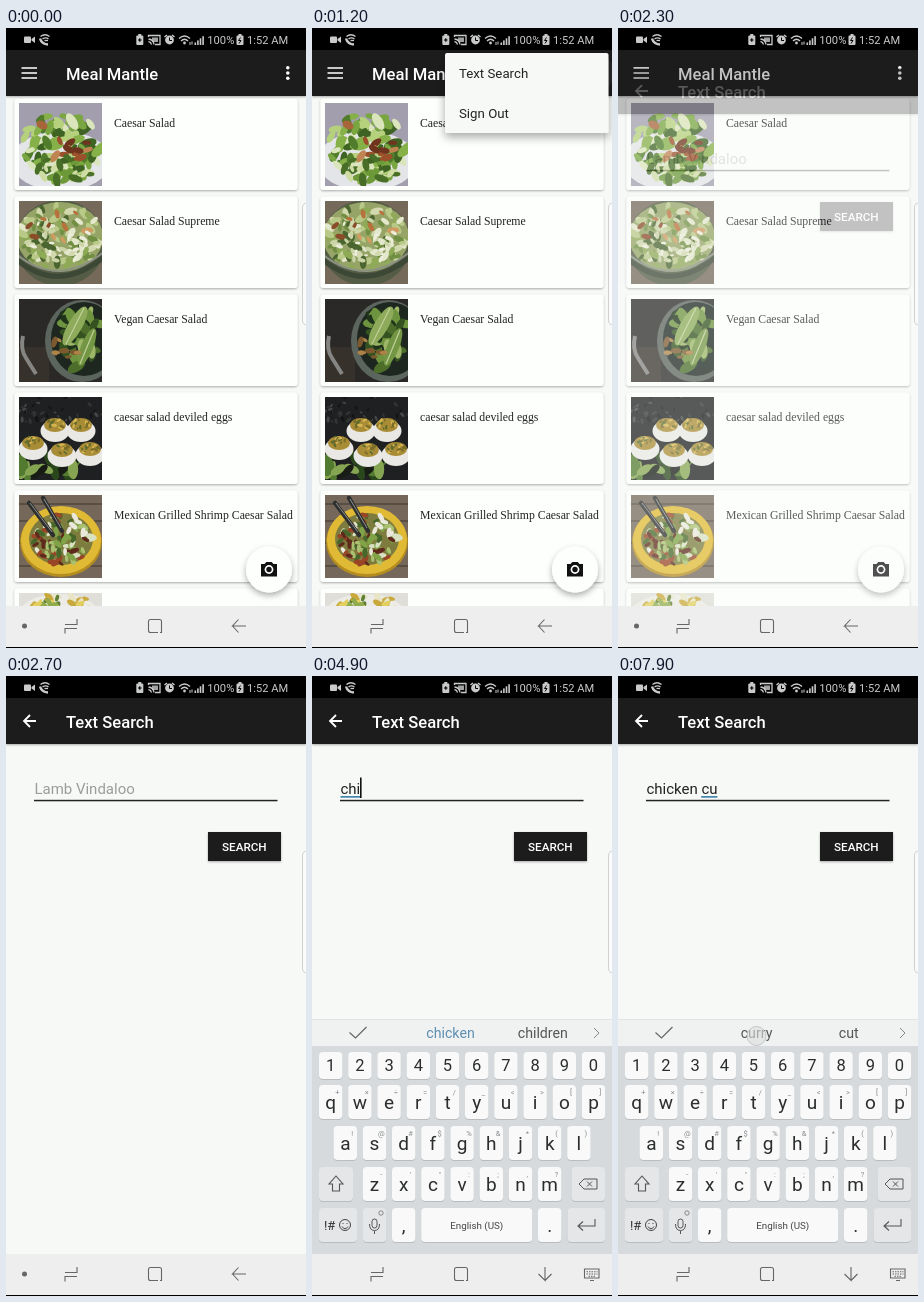
Write an HTML page that moves like this. It is 300x620 px and loops after 8 s.

```html
<!DOCTYPE html>
<html lang="en">
<head>
<meta charset="utf-8">
<title>Recipe text search</title>
<style>
  html, body { margin: 0; width: 100%; height: 100%; overflow: hidden; background: #000; }
  svg { display: block; width: 100vw; height: 100vh; font-family: Roboto, sans-serif; }
  text { white-space: pre; }
  .mid { text-anchor: middle; }
  .medium { font-weight: 500; }
  .serif { font-family: "Liberation Serif", serif; }
  .line { fill: none; stroke: #666; stroke-width: 1.1; }
</style>
</head>
<body>
<svg id="stage" viewBox="0 0 300 620" xmlns="http://www.w3.org/2000/svg"></svg>
<script>
const INK = '#1c1e1e', PAPER = '#f7f9f7', ICON = '#c9cbca';

const rect = (x, y, w, h, fill, extra = '') =>
  `<rect x="${x}" y="${y}" width="${w}" height="${h}" fill="${fill}" ${extra}/>`;
const circle = (x, y, r, fill, extra = '') =>
  `<circle cx="${x}" cy="${y}" r="${r}" fill="${fill}" ${extra}/>`;
const oval = (x, y, rx, ry, fill, angle = 0) =>
  `<ellipse rx="${rx}" ry="${ry}" fill="${fill}" transform="translate(${x} ${y}) rotate(${angle})"/>`;
const line = (d, stroke, width = 1, extra = '') =>
  `<path d="${d}" fill="none" stroke="${stroke}" stroke-width="${width}" ${extra}/>`;
const label = (x, y, size, fill, str, cls = '', extra = '') =>
  `<text x="${x}" y="${y}" font-size="${size}" fill="${fill}" class="${cls}" ${extra}>${str}</text>`;

// Scatter seeded ellipses inside an elliptical area.
function scatter(seed, n, cx, cy, rx, ry, size, colors) {
  const rnd = () => (seed = (seed * 16807) % 2147483647) / 2147483647;
  for (let i = 0; i < 5; i++) rnd();
  let out = '';
  for (let i = 0; i < n; i++) {
    const a = rnd() * 6.283, d = Math.sqrt(rnd()), s = size * (0.6 + rnd() * 0.7);
    out += oval((cx + rx * d * Math.cos(a)).toFixed(1), (cy + ry * d * Math.sin(a)).toFixed(1),
      s.toFixed(1), (s * 0.5).toFixed(1), colors[i % colors.length], Math.round(rnd() * 180));
  }
  return out;
}

const egg = (x, y) => oval(x, y + 3, 14.5, 11, '#e9e8e4') + oval(x, y - 3, 11, 7, '#a98c36') +
  scatter(x * 31 + y, 14, x, y - 4, 9, 5, 2.3, ['#d5b552', '#7b6c28', '#5d6b2c']);

const photos = [
  () => rect(0, 0, 83, 83, '#a29eae') + oval(42, 58, 50, 30, '#e4e5e8') +
    scatter(71, 70, 43, 43, 39, 33, 8, ['#86b048', '#b5d17c', '#507c2b', '#dbe5bb', '#79a640', '#3e6323']) +
    scatter(19, 11, 50, 46, 22, 11, 5.5, ['#9b4f2b', '#6f341d', '#c08452']) + oval(23, 22, 6, 4, '#a7653a', 30) +
    scatter(43, 24, 46, 67, 34, 12, 6, ['#6d9939', '#cfdda5', '#496e28']),
  () => rect(0, 0, 83, 83, '#75695a') + oval(41, 42, 45, 43, '#545c46') + oval(41, 36, 43, 35, '#96a468') +
    scatter(97, 95, 41, 36, 40, 32, 5.5, ['#b9c987', '#718f42', '#e3e7cb', '#8faa57', '#4a652f', '#d2d9ae']) +
    scatter(8, 10, 38, 24, 33, 18, 5, ['#b7713c', '#8b4c29', '#cf9b61']) +
    scatter(29, 30, 42, 40, 34, 24, 3.2, ['#eceddb', '#cbd4a7']) +
    line('M-3 53Q40 88 86 50', '#8b9283', 2) + line('M-2 59Q40 93 85 56', '#3c4735', 5),
  () => rect(0, 0, 83, 83, '#2a2928') + rect(0, 48, 30, 35, '#37312c') +
    oval(63, 42, 37, 41, '#5c645e') + oval(65, 40, 33, 37, '#1d2720') +
    scatter(53, 36, 61, 38, 23, 32, 8, ['#6f9440', '#34521f', '#9db668', '#4c6e2a', '#1f321a']) +
    oval(56, 27, 7, 22, '#8dab5a', 30) + oval(68, 48, 6, 20, '#739644', 22) +
    line('M65 9L47 45M75 31L61 65', '#c1d09a', 1.2) +
    scatter(12, 9, 47, 48, 14, 13, 4.5, ['#ad8347', '#7c592f']) +
    line('M4 37Q1 50 7 59L17 75', '#858583', 4),
  () => rect(0, 0, 83, 83, '#1f2021') +
    scatter(5, 40, 40, 14, 46, 16, 2.5, ['#323435', '#131415', '#454746']) +
    scatter(61, 28, 30, 69, 38, 13, 8, ['#527b31', '#2a471c', '#86a552', '#171d15']) +
    egg(36, 31) + egg(62, 31) + egg(14, 49) + egg(43, 56) + egg(71, 55),
  () => rect(0, 0, 83, 83, '#75685a') + line('M0 9H83M0 26H83M0 48H83M0 71H83', '#50463c', 1.5) +
    oval(42, 47, 41, 35, '#b48d20') + oval(42, 45, 40, 34, '#e0ba34') + oval(42, 44, 32, 26, '#7d7c3e') +
    scatter(37, 85, 42, 44, 31, 25, 4.5, ['#7fa346', '#d9e1c2', '#994627', '#47672a', '#e9e8db', '#5f2a1c', '#a9c071']) +
    line('M10 8L34 40M24 3L43 36', '#2e302f', 4.5, 'stroke-linecap="round"') +
    line('M11 8L33 37M25 4L42 33', '#8e918e', 1),
  () => rect(0, 0, 83, 83, '#dfded8') + oval(40, 22, 41, 21, '#ecebe5') +
    scatter(77, 60, 44, 18, 36, 16, 5, ['#8fab4c', '#e2cf5f', '#5f8136', '#e8e4c6', '#c9a93c'])
];
const dishes = ['Caesar Salad', 'Caesar Salad Supreme', 'Vegan Caesar Salad',
  'caesar salad deviled eggs', 'Mexican Grilled Shrimp Caesar Salad', ''];

const card = (name, i) => `<g transform="translate(0 ${98 * i})">
  ${rect(8.5, 70.5, 283, 91.5, '#fdfffd', 'rx="3" filter="url(#soft)"')}
  <g transform="translate(13 75)" clip-path="url(#photo)"><g filter="url(#blur)">${photos[i]()}</g></g>
  ${label(108, 98.5, 11.75, '#222', name, 'serif')}</g>`;

const toolbar = (title, icon, width) => rect(0, 22, 300, 46, INK, 'filter="url(#soft)"') +
  label(60, 51.5, 16.6, '#fff', title, 'medium') + line(icon, '#fff', width);

const home = () => rect(0, 22, 300, 556, PAPER) + dishes.map(card).join('') +
  toolbar('Meal Mantle', 'M15.5 40H31M15.5 45H31M15.5 50H31', 1.7) +
  [39.8, 45, 50.2].map(y => circle(281.8, y, 1.8, '#fff')).join('') +
  circle(263, 541.5, 23, '#fdfffd', 'filter="url(#lift)"') +
  '<path d="M255 536h3.5l1.8-2h5.4l1.8 2h3.5v12.5h-16z" fill="#111"/>' +
  circle(263, 541.5, 4.4, '#fff') + circle(263, 541.5, 2.7, '#111');

const popup = () => rect(133, 25, 163.5, 80, PAPER, 'rx="2" filter="url(#float)"') +
  `<g clip-path="url(#item)">${rect(133, 25, 164, 40, '#000', 'id="press" opacity="0"')}
   ${circle(230, 48, 0, '#000', 'id="ripple" opacity=".05"')}</g>` +
  label(147, 50, 13.25, '#222', 'Text Search') + label(147, 90, 13.25, '#222', 'Sign Out');

const search = () => rect(0, 22, 300, 598, PAPER) +
  toolbar('Text Search', 'M30 45H18M24 39L18 45L24 51', 1.8) +
  label(28.4, 118, 15, '#9b9c9b', 'Lamb Vindaloo', '', 'id="hint"') +
  label(28.4, 118, 15, '#222', '', '', 'id="field"') +
  rect(28, 123.8, 243.5, 1.5, '#222') +
  rect(0, 120, 0, 1.7, '#4287ae', 'id="underline"') + rect(0, 101.5, 1.6, 20.5, '#111', 'id="cursor"') +
  rect(202, 156, 73, 29, INK, 'filter="url(#soft)"') +
  label(238.3, 175.2, 11.67, '#fff', 'SEARCH', 'mid medium');

const key = (x, y, w, h, fill = '#f8f9f8') =>
  rect(x, y + 1, w, h, '#b9bdc0', 'rx="4"') + rect(x, y, w, h, fill, 'rx="4"');

function keyRow(letters, x, y, h, size, hints = '') {
  return [...letters].map((ch, i) => {
    const left = x + 29.2 * i;
    return key(left, y, 23.4, h) + label(left + 11.7, y + h / 2 + size * 0.36, size, '#2b2d2e', ch, 'mid') +
      (hints[i] ? label(left + 18.5, y + 9.5, 7.5, '#8a8d8f', hints[i].replace('&', '&amp;').replace('<', '&lt;'), 'mid') : '');
  }).join('');
}

function keyboard() {
  const grey = '#e4e6e7', dark = '#555';
  return rect(0, 343, 300, 277, '#d6dadd') + rect(0, 343, 300, 27, '#f0f2f2') + rect(0, 343, 300, 0.8, '#dfe2e2') +
    [45.6, 138.5, 230.8].map((x, i) => label(x, 362, 14.2, dark, '', 'mid', `id="word${i}"`)).join('') +
    line('M37.5 356.5L43.5 362L54.5 351', '#666', 1.2, 'id="check"') + line('M282 352L287 357L282 362', '#888') +
    keyRow('1234567890', 7, 376, 27, 16.5) +
    keyRow('qwertyuiop', 7, 409, 34, 19, '+×÷=/_<>[]') +
    keyRow('asdfghjkl', 21.6, 450, 34, 19, '!@#$%&*()') +
    keyRow('zxcvbnm', 50.8, 491, 34, 19, "-'\":;,?") +
    key(7, 491, 34, 34, grey) + line('M24 500L31 508H27.5V515H20.5V508H17Z', dark, 1.1) +
    key(259.5, 491, 33.5, 34, grey) + line('M267 508L272 503H285V513H272ZM275 505.5L280 510.5M280 505.5L275 510.5', dark) +
    key(7, 532, 38, 34, grey) + label(12, 554, 13, '#333', '!#') + circle(33, 549, 5.5, 'none', 'stroke="#444"') +
    line('M30 550.5Q33 555 36 550.5M31 547v1M35 547v1', '#444') +
    key(51, 532, 23.4, 34, grey) + rect(60, 543, 5, 9, 'none', 'rx="2.5" stroke="#555"') +
    line('M57.5 548Q57.5 554.5 62.5 554.5T67.5 548M62.5 555V558', dark) + circle(69, 537, 2.2, 'none', 'stroke="#888"') +
    keyRow(',', 80, 532, 34, 19) + keyRow('.', 226, 532, 34, 19) +
    key(109.2, 532, 111, 34) + label(164.7, 552.5, 9.8, '#444', 'English (US)', 'mid') +
    key(255.5, 532, 37.5, 34, grey) + line('M283 543V550H266M271 545.5L266 550L271 554.5', dark, 1.1);
}

const battery = x => rect(x, 7.5, 7, 9.5, ICON, 'rx="1"') + rect(x + 2, 6, 3, 2, ICON);

const statusBar = () => rect(0, 0, 300, 22, '#000') +
  rect(18, 8.5, 7, 6.5, ICON, 'rx="1"') + `<path d="M25.5 11L29 8.5V15L25.5 12.5Z" fill="${ICON}"/>` +
  line('M34.5 8.5Q39 5 43.5 8.5M36.5 11Q39.5 8.8 42.5 11', ICON, 1.3) +
  line('M34 10.5Q35.5 16 42 16.5', ICON, 2.4) + line('M38.5 12.5H42', ICON, 1.3) +
  battery(130.3) + line('M132 12H135.6M133.8 10.2V13.8', '#000', 1.2) +
  line('M142.5 9V7.5H154V16.5H149M142.5 11Q147.5 11.5 148 16.5M142.5 13.5Q145 14 145.5 16.5', ICON, 1.3) +
  rect(146, 9.5, 6, 4.5, ICON, 'opacity=".8"') +
  circle(163.5, 12, 4.4, ICON) + line('M163.5 9.5V12.5H166', '#000') + line('M158.5 9L161 7M166 7L168.5 9', ICON, 1.5) +
  line('M173 10.5Q178.5 5.5 184 10.5M175 13Q178.5 9.5 182 13', ICON, 1.4) + circle(178.5, 15, 1.4, ICON) +
  line('M184 14v3M186 13.5v3', ICON) +
  [0, 1, 2, 3].map(i => rect(188.5 + i * 2.6, 14.5 - i * 2.1, 1.6, 2.5 + i * 2.1, ICON)).join('') +
  label(201.3, 16, 11.2, ICON, '100%') + label(241, 16, 11.1, ICON, '1:52 AM') +
  battery(230.5) + line('M234.5 9.5L232.5 12.5H235L233 15.5', '#000');

const navBar = () => rect(0, 578, 300, 41, '#eeeeee') + rect(0, 619, 300, 1, '#000') +
  circle(18.5, 598, 2.5, '#666', 'id="navDot"') +
  '<path class="line" d="M59 596.5H71V591M71 600.5H59V605.5"/>' +
  '<path class="line" d="M152 604.5H144.5Q142.5 604.5 142.5 602.5V593.5Q142.5 591.5 144.5 591.5H153.5Q155.5 591.5 155.5 593.5V604.5H154"/>' +
  '<path class="line" id="navBack" d="M240 598H226.5L232.5 591.5M226.5 598L232.5 604.5"/>' +
  `<g id="navKeys"><path class="line" d="M233 591V604.5L226.5 598M233 604.5L239.5 598"/>
   <path class="line" d="M272.5 593H287V602H272.5ZM278 604.5H282"/>
   <path class="line" stroke-dasharray="1.5 1" d="M274.5 595.8H285.5M274.5 598H285.5M276.5 600.3H283.5"/></g>`;

const shadow = (id, dy, spread, opacity) => `<filter id="${id}" x="-30%" y="-30%" width="160%" height="170%">
  <feDropShadow dx="0" dy="${dy}" stdDeviation="${spread}" flood-opacity="${opacity}"/></filter>`;

const stage = document.getElementById('stage');
stage.innerHTML = `<defs>
  <clipPath id="photo"><rect width="83" height="83"/></clipPath>
  <clipPath id="item"><rect x="133" y="25" width="163.5" height="40"/></clipPath>
  <filter id="blur"><feGaussianBlur stdDeviation=".5"/></filter>
  ${shadow('soft', 1, 1, 0.32)}${shadow('lift', 3, 3.2, 0.32)}${shadow('float', 4, 5, 0.34)}
  </defs>
  <g id="home">${home()}</g>
  ${circle(282, 45, 0, '#fff', 'id="menuRipple"')}
  <g id="popup">${popup()}</g>
  <g id="search">${search()}</g>
  <path d="M301 175Q296.5 175 296.5 180V292Q296.5 297 301 297" fill="#fafbfa" stroke="#cfd1d0"/>
  <g id="keyboard">${keyboard()}</g>
  ${navBar()}${statusBar()}
  ${circle(0, 0, 9.5, '#dcdedd', 'id="tap" fill-opacity=".6" stroke="#b5b8b8" stroke-opacity=".7"')}`;

const $ = id => document.getElementById(id);
const set = (id, attrs) => { for (const k in attrs) $(id).setAttribute(k, attrs[k]); };
const show = (id, on) => set(id, { visibility: on ? 'visible' : 'hidden' });
const ramp = (t, a, b) => Math.min(1, Math.max(0, (t - a) / (b - a)));
const easeOut = u => 1 - (1 - u) ** 3;
const during = (t, spans) => spans.some(([a, b]) => t >= a && t < b);
const latest = (t, steps) => steps.filter(s => t >= s[0]).pop();

// [start, text, caret x]
const typing = [[0, '', 28.2], [4200, 'c', 36.5], [4400, 'ch', 44.7], [4700, 'chi', 48],
  [5400, 'chicken ', 83.2], [6500, 'chicken c', 91.2], [7000, 'chicken cu', 99.6]];
// [start, left, middle, right, underline x, underline width]; an empty left word shows the check mark
const hints = [[0, '3pm', 'this', 'in', 0, 0], [4800, '', 'chicken', 'children', 28.5, 19.5],
  [5500, 'soup', 'and', 'breast', 0, 0], [7200, '', 'curry', 'cut', 83.2, 16.2]];
const blinks = [[2400, 2700], [3200, 3700], [4200, 5400], [5500, 6100], [6500, 7600]];
// [x, y, start, end]
const taps = [[282, 45, 700, 900], [230, 48, 1800, 2150], [140, 112, 3100, 3250], [120, 508, 4100, 4250],
  [179, 467, 4350, 4500], [222, 426, 4600, 4750], [138, 358, 5200, 5400], [120, 508, 6400, 6600],
  [193, 423, 6900, 7200], [138.5, 360, 7900, 8000]];

function render(t) {
  const open = easeOut(ramp(t, 850, 1100)), fade = 1 - ramp(t, 2180, 2300);
  set('popup', { opacity: open * fade,
    transform: `translate(297 25) scale(${0.5 + open / 2} ${0.2 + open * 0.8}) translate(-297 -25)` });
  set('menuRipple', { r: 20 * easeOut(ramp(t, 700, 950)),
    opacity: 0.22 * ramp(t, 700, 750) * (1 - ramp(t, 950, 1300)) });
  set('press', { opacity: 0.035 * ramp(t, 1800, 1950) });
  set('ripple', { r: 41 * ramp(t, 1800, 2100) + 100 * ramp(t, 2110, 2250) });

  const enter = ramp(t, 2230, 2500);
  set('search', { opacity: enter, transform: `translate(0 ${45 * (1 - easeOut(enter))})` });
  show('search', enter > 0);

  const [, text, caret] = latest(t, typing);
  $('field').textContent = text;
  show('hint', !text && enter > 0);
  set('cursor', { x: caret });
  show('cursor', during(t, blinks));

  const [, left, middle, right, x, width] = latest(t, hints);
  [left, middle, right].forEach((word, i) => { $('word' + i).textContent = word; });
  set('word1', { fill: middle === 'chicken' ? '#5d8fb1' : '#555' });
  const raised = t >= 3200;
  show('check', raised && !left);
  set('underline', { x, width });

  show('keyboard', raised);
  set('keyboard', { transform: `translate(0 ${235 * (1 - easeOut(ramp(t, 3200, 3600)))})` });
  show('navKeys', raised);
  show('navBack', !raised);
  show('navDot', t < 600 || (t >= 1800 && !raised));

  const tap = taps.find(([, , a, b]) => t >= a && t < b);
  show('tap', tap);
  if (tap) set('tap', { cx: tap[0], cy: tap[1], opacity: t > 1700 && t < 2200 ? 0.25 : 1 });
}

const start = performance.now();
function tick(now) {
  render(Math.max(0, now - start) % 8000);
  requestAnimationFrame(tick);
}
render(0);
requestAnimationFrame(tick);
</script>
</body>
</html>
```
